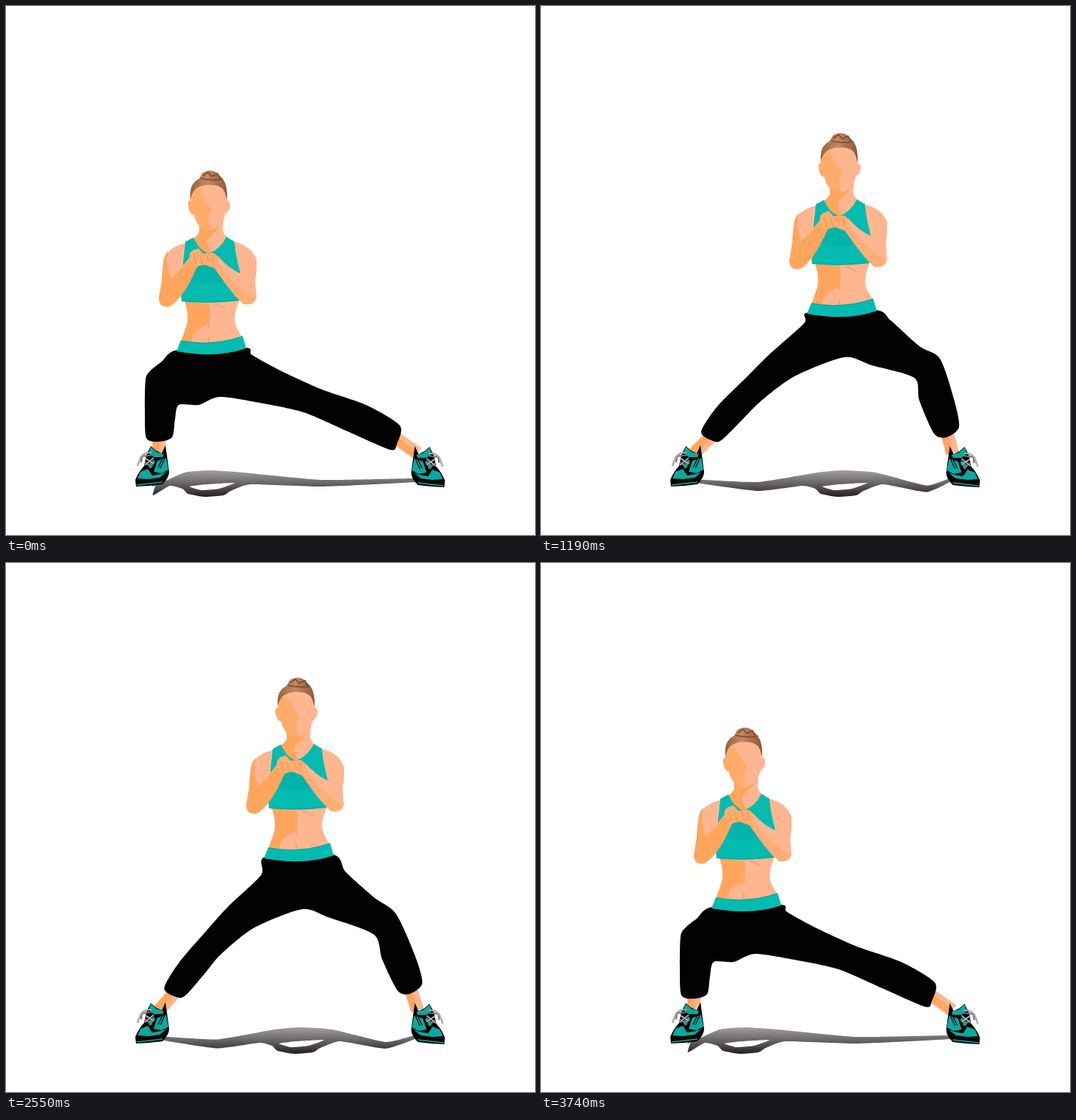
An HTML page with a canvas that plays this animation: 720 by 720 pixels, repeating every 3.91 s.

```html
<!DOCTYPE html>
<html lang="en">
<head>
<meta charset="utf-8">
<title>Side lunge</title>
<style>
html, body { margin: 0; width: 100%; height: 100%; overflow: hidden; background: #fff; }
canvas { display: block; }
</style>
</head>
<body>
<canvas id="stage" width="720" height="720"></canvas>
<script>
const ctx = document.getElementById('stage').getContext('2d');
const STEP = 170;
const PEACH = '#fdb68f', ORANGE = '#ffa55c', TEAL = '#04bbb0', DARK_TEAL = '#0aa99f', BLACK = '#020202';

// head centre and crown at each step
const headX = [276, 281, 294, 312, 333, 357, 382, 406, 431, 448, 453, 452, 446, 440, 418, 395, 372, 351, 323, 302, 286, 278, 276];
const headY = [224, 215, 190, 163, 139, 130, 142, 173, 207, 235, 242, 241, 228, 215, 185, 156, 137, 136, 151, 177, 204, 221, 224];

// trouser outlines at key head positions: hip, thigh, knee, shin, cuff and back up
const keyX = [276, 312, 351, 406, 440, 448];
const leftLeg = [
  [212,484, 197,496, 190,508, 189,550, 191,588, 208,593, 226,587, 230,563, 235,543, 262,543, 291,532],
  [252,429, 232,460, 213,488, 203,530, 196,580, 215,590, 230,583, 237,556, 245,514, 285,484, 331,468],
  [304,396, 270,440, 240,485, 217,540, 205,576, 228,586, 239,578, 255,543, 266,512, 308,467, 363,444],
  [358,432, 310,475, 282,503, 240,545, 218,580, 237,593, 248,589, 275,562, 299,538, 345,504, 413,478],
  [380,475, 355,492, 318,518, 265,549, 226,580, 243,602, 263,596, 305,574, 350,548, 395,535, 443,525],
  [385,492, 360,508, 328,528, 270,553, 229,579, 240,605, 265,598, 305,578, 350,564, 395,554, 452,545]
];
const rightLeg = [
  [345,540, 405,553, 465,579, 523,604, 532,596, 536,571, 490,543, 430,522, 375,497, 335,475],
  [375,484, 435,517, 478,558, 524,591, 540,584, 547,567, 508,519, 450,475, 410,444, 372,416],
  [398,457, 472,505, 500,550, 525,582, 540,584, 557,566, 530,518, 480,465, 440,420, 408,391],
  [450,489, 508,506, 515,537, 535,582, 552,587, 569,573, 562,535, 543,480, 515,463, 476,428],
  [485,533, 521,522, 525,550, 540,583, 555,587, 574,575, 571,535, 565,493, 550,475, 510,463],
  [490,554, 521,539, 530,560, 540,583, 556,586, 573,574, 567,525, 563,490, 548,477, 505,472]
];

function blend(keys, x) {
  let i = 0;
  while (i < keyX.length - 2 && x > keyX[i + 1]) i++;
  const k = (x - keyX[i]) / (keyX[i + 1] - keyX[i]);
  const flat = keys[i].map((v, j) => v + (keys[i + 1][j] - v) * k);
  return pairs(flat);
}

function pairs(flat) {
  const out = [];
  for (let i = 0; i < flat.length; i += 2) out.push([flat[i], flat[i + 1]]);
  return out;
}

// closed curve through the points
function loop(path, pts, pull = 0.13) {
  const n = pts.length, at = i => pts[(i + n) % n];
  path.moveTo(...pts[0]);
  for (let i = 0; i < n; i++) {
    const [a, b, c, d] = [at(i - 1), at(i), at(i + 1), at(i + 2)];
    path.bezierCurveTo(
      b[0] + (c[0] - a[0]) * pull, b[1] + (c[1] - a[1]) * pull,
      c[0] - (d[0] - b[0]) * pull, c[1] - (d[1] - b[1]) * pull, ...c);
  }
  path.closePath();
}

function fill(d, color) {
  ctx.fillStyle = color;
  ctx.fill(new Path2D(d));
}

function line(d, color, width) {
  ctx.strokeStyle = color;
  ctx.lineWidth = width;
  ctx.stroke(new Path2D(d));
}

function shadow(x) {
  const u = (x - 276) / 172, c = x + 2 + 4 * u;
  const lx = 200 + 125 * u, ly = 660 - 8 * u;
  const rx = 430 + 125 * u, ry = 649 + 10 * u;
  const path = new Path2D();
  loop(path, pairs([
    205,644, lx,ly - 6, c - 35,635, c,632, c + 45,635, rx,ry - 4, 556,643, 556,648, rx,ry + 5,
    c + 55,651, c + 28,660, c + 18,666, c - 8,668, c - 30,664, c - 38,657, c - 55,653, lx,ly + 6, 205,648
  ]), 0.08);
  loop(path, pairs([c - 28,654, c - 5,651, c + 33,649, c + 12,657, c - 12,659]), 0.08);
  const shade = ctx.createLinearGradient(0, 630, 0, 670);
  shade.addColorStop(0, '#aaa6a5');
  shade.addColorStop(0.5, '#686463');
  shade.addColorStop(1, '#1c1919');
  ctx.fillStyle = shade;
  ctx.fill(path, 'evenodd');
}

function ankle(a, b, x, y) {
  const mx = (a[0] + b[0]) / 2, my = (a[1] + b[1]) / 2;
  line(`M${mx} ${my}L${x} ${y}`, PEACH, 18);
  line(`M${mx - 4} ${my}L${x - 4} ${y}`, ORANGE, 9);
}

function shoe() {
  fill('M176 645Q181 633 188 626L191 611 197 599 204 605 212 609 217 598 219 612 222 634Q222 642 213 651L195 653 177 654Z', BLACK);
  fill('M197 600L205 607 215 610 213 614 201 614 194 608Z', DARK_TEAL);
  fill('M206 619L218 615 221 631 212 636 201 634Z', DARK_TEAL);
  fill('M183 634L193 630 199 639 211 637 219 634 209 642 193 644 179 643Z', DARK_TEAL);
  fill('M193 625L201 617 203 621 196 630Z', DARK_TEAL);
  line('M178 652L195 650 213 648', DARK_TEAL, 1.5);
  line('M214 614L207 628 M216 616L210 629', '#111', 1.4);
  line('M198 608Q185 607 182 618L179 626 M199 611L185 613 184 621 M190 616L201 623 M201 615L189 625 M189 621L199 628', '#777', 2.2);
  line('M198 608Q185 607 182 618L179 626 M190 616L201 623 M201 615L189 625', '#ddd', 1);
}

function pants(left, right, dx, dy) {
  const path = new Path2D();
  loop(path, [[234 + dx, 468 + dy], ...left, ...right, [326 + dx, 465 + dy]]);
  ctx.fillStyle = BLACK;
  ctx.fill(path);
}

function torso() {
  // neck, shoulders and belly
  fill('M263 290L263 308Q258 316 243 323L238 360 243 400Q251 425 244 440L237 460Q280 466 323 454L314 438Q307 424 318 400L318 350 311 320Q297 316 295 305L296 288Z', PEACH);
  fill('M263 291L263 308Q260 315 253 318L264 336 280 336Q272 325 274 318L290 302Z', ORANGE);
  fill('M243 402Q251 425 244 440L238 458 254 459Q250 449 264 439L274 434 277 406Z', ORANGE);
  line('M277 410L276 438 M276 450L276 458', '#f8a171', 1.8);
  line('M284 406Q294 408 299 413', '#f2a477', 2);

  // top
  fill('M244 321L255 315Q263 333 276 337 292 331 300 314L311 321Q313 345 319 362L314 384 317 401Q277 406 239 402L238 394Q245 377 243 365L241 350Z', TEAL);
  fill('M259 352Q275 349 291 356L301 373Q278 382 252 373Z', '#02b3aa');
  line('M239 401Q277 405 317 400', DARK_TEAL, 1.5);

  // arms
  fill('M243 323Q222 328 215 344 212 360 212 374L208 398Q209 411 222 409 240 400 259 357L250 342 239 356Q240 340 243 323Z', PEACH);
  fill('M221 333Q214 340 214 352L212 374 208 398Q209 411 222 409 240 400 259 357L250 345 239 357 224 372Q216 350 221 333Z', ORANGE);
  fill('M311 321Q335 327 341 346 342 362 339 374L341 397Q338 408 324 406 308 393 284 357L288 340Q303 357 319 364 317 345 311 321Z', PEACH);
  fill('M284 356L290 351Q303 374 339 397 339 407 324 406 308 393 284 356Z', '#ffad76');

  // hands
  fill('M250 344Q248 336 255 332L262 330 268 337 282 336Q289 339 289 346L284 357 270 352 262 354 257 358Z', '#ffad70');
  line('M255 339L259 351 M264 339L267 351 M273 339L277 349 M281 339L283 351', '#f99a57', 1.6);

  // head, left plain
  fill('M253 247L251 265Q247 264 248 272 250 284 256 284 258 294 264 300 277 311 294 297L299 282Q305 280 305 271 305 264 301 265L299 247Q276 235 253 247Z', PEACH);
  fill('M253 247L251 265Q247 264 248 272 250 284 256 284 258 294 264 300 271 306 278 304L275 290 280 278 272 266 263 249Z', '#ffab69');

  const hair = ctx.createLinearGradient(250, 0, 302, 0);
  hair.addColorStop(0, '#96603f');
  hair.addColorStop(0.45, '#c28a62');
  hair.addColorStop(1, '#8c5437');
  fill('M251 263Q249 247 257 239L264 234Q266 226 272 225 280 222 287 227L295 235Q302 245 301 264L298 254Q295 246 285 244 268 242 258 249 253 254 251 263Z', hair);
  line('M264 234Q276 238 294 236 M268 231L275 226 280 232 288 228 291 235', '#7b4930', 1.6);
  line('M257 246L267 237 M269 242L274 237 M285 242L283 237 M296 247L290 238', '#a8714c', 1);

  // waistband
  fill('M238 455Q281 463 322 449L327 466Q286 480 232 470Z', TEAL);
  line('M238 456Q281 464 322 450', DARK_TEAL, 1.2);
}

function draw(step) {
  const x = headX[step], y = headY[step], dx = x - 276, dy = y - 224;
  const left = blend(leftLeg, x), right = blend(rightLeg, x);
  ctx.fillStyle = '#fff';
  ctx.fillRect(0, 0, 720, 720);
  shadow(x);
  ankle(left[4], left[6], 208, 609);
  ankle(right[3], right[5], 560, 609);
  shoe();
  ctx.save();
  ctx.transform(-1, 0, 0, 1, 773.5, 1);
  shoe();
  ctx.restore();
  pants(left, right, dx, dy);
  ctx.save();
  ctx.translate(dx, dy);
  torso();
  ctx.restore();
}

function tick() {
  draw(Math.floor(performance.now() / STEP) % headX.length);
  requestAnimationFrame(tick);
}
tick();
</script>
</body>
</html>
```
